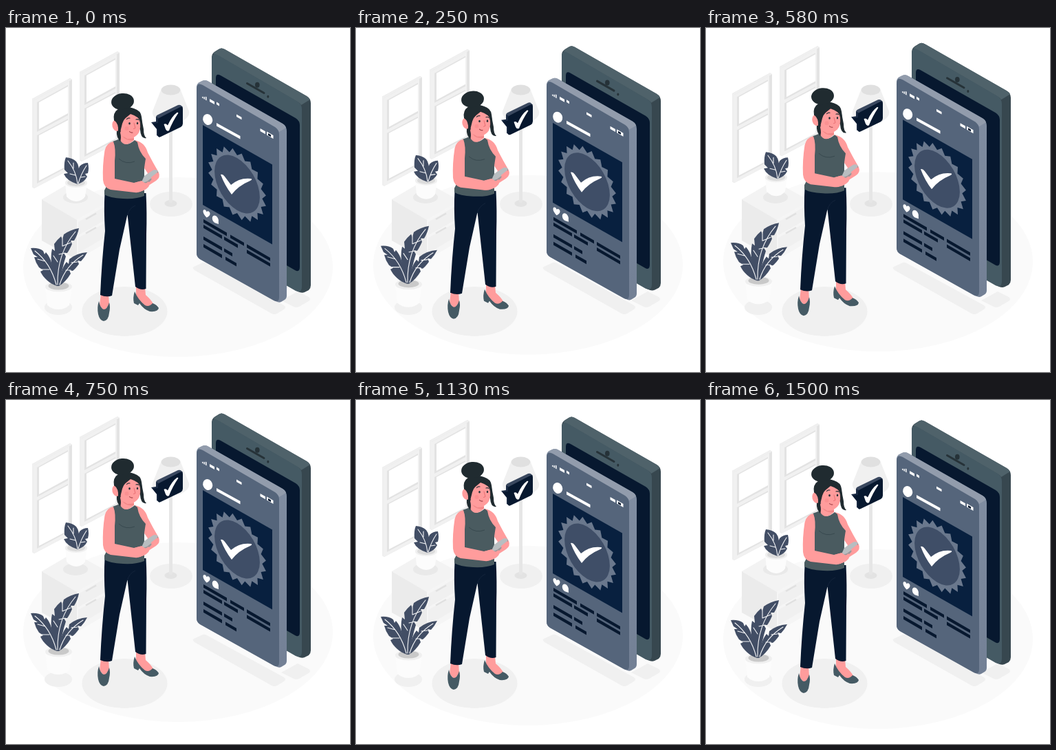
Recreate the animation shown at these times as an HTML page. Size 500 px wide and 500 px high, loop 1540 ms.

```html
<!DOCTYPE html>
<html lang="en">
<head>
<meta charset="utf-8">
<title>Verified post</title>
<style>
  html, body { margin: 0; width: 100%; height: 100%; overflow: hidden; background: #fff; }
  svg { display: block; width: 100vw; height: 100vh; }
  .vein { fill: none; stroke: #f4f5f7; stroke-width: 1.1; stroke-linecap: round; }
</style>
</head>
<body>
<svg viewBox="0 0 500 500">
  <defs>
    <linearGradient id="side" x1="0" y1="0" x2="0" y2="1">
      <stop offset="0" stop-color="#8390a4"/><stop offset="1" stop-color="#738095"/>
    </linearGradient>
    <g id="window">
      <path fill="#e3e3e3" d="M38 103 93 73 96 75V204L41 233 38 231Z"/>
      <path fill="#f0f0f0" d="M38 103 93 73 96 75 41 105V233L38 231Z"/>
      <path fill="#f1f1f1" d="M41 105 92 77V206L41 233Z"/>
      <path fill="#e3e3e3" d="M45 108 90 83V127L45 151ZM45 156 90 132V202L45 226Z"/>
      <path fill="#fff" d="M48 108 90 85V124L48 147ZM48 156 90 134V200L48 222Z"/>
    </g>
  </defs>

  <g class="float">
    <ellipse cx="250" cy="347.5" rx="225" ry="130.5" fill="#fafafa"/>
    <use href="#window"/>
    <use href="#window" x="69" y="-39"/>
  </g>

  <g id="ground" fill="#f0f0f0">
    <ellipse cx="172.500" cy="412" rx="62" ry="36"/>
    <ellipse cx="76" cy="406" rx="20" ry="11"/>
    <path d="M273 347 286 341Q289 340 292 342L404 403Q408 406 404 409L394 415Q390 417 386 415L274 352Q270 349 273 347Z"/>
    <path d="M400 396 424 383 440 391Q444 394 440 397L426 405Q422 407 418 405Z"/>
  </g>

  <g id="cabinet">
    <path fill="#f3f3f3" d="M52 249 98 222 151 251 103 279Z"/>
    <path fill="#ebebeb" d="M52 249 103 279V337L52 309Z"/>
    <path fill="#f5f5f5" d="M103 279 151 251V309L103 337Z"/>
    <path fill="#f0f0f0" d="M105 282 148 257V277L105 301ZM105 305 148 281V302L105 327Z"/>
    <path fill="none" stroke="#e0e0e0" stroke-width="2.500" d="M116 278 131 269.500M116 298.500 131 290"/>
    <ellipse cx="101" cy="246" rx="18" ry="9" fill="#e9e9e9"/>
  </g>

  <g id="lamp">
    <ellipse cx="240" cy="256" rx="31" ry="18" fill="#f0f0f0"/>
    <ellipse cx="239.500" cy="255" rx="9" ry="5" fill="#e3e3e3"/>
    <path fill="#e6e6e6" d="M237 130H242V253Q239.500 255 237 253Z"/>
    <path fill="#f0f0f0" d="M226 88 213 121C211 130 224 139 239.500 139S268 130 266 121L253 88Z"/>
    <ellipse cx="239.500" cy="90" rx="13.800" ry="7.500" fill="#e0e0e0"/>
  </g>

  <g class="float">
    <g id="smallPlant">
      <path fill="#fcfcfc" d="M86 225 88 245Q94 252 102 252T115 245L118 225Z"/>
      <ellipse cx="102" cy="225" rx="16" ry="7" fill="#f0f0f0"/>
      <ellipse cx="102" cy="225" rx="13" ry="5" fill="#dcdcdc"/>
      <path fill="#424e65" d="M104 227Q88 222 84 212L90 211 85 206Q84 195 87 188 97 189 102 194 107 200 106 214ZM104 227Q103 208 107 201 112 196 119 196 121 204 119 211L115 212 118 216Q114 224 104 227Z"/>
      <path class="vein" d="M104 226Q102 208 90 193M105 226Q109 212 117 200M101 214 93 212M98 204 98 196M109 217 115 216"/>
    </g>
    <g id="bigPlant">
      <path fill="#fcfcfc" d="M57 377 60 403Q67 409 76 409T92 403L96 377Z"/>
      <ellipse cx="76.500" cy="376" rx="19.500" ry="7.500" fill="#f0f0f0"/>
      <ellipse cx="76.500" cy="375" rx="15" ry="5.500" fill="#c9c9c9"/>
      <g fill="#424e65">
        <path d="M74 375C64 372 54 363 50 354L54 352 48 348Q43 341 41 333L46 333 40 329 36 320Q47 319 54 324L56 329 58 326Q64 333 66 341 71 355 74 375Z"/>
        <path d="M77 375C78 360 82 347 88 340L91 343 92 336Q103 327 118 326 114 334 109 339L104 338 106 343Q101 350 97 353L92 352 94 357Q87 369 77 375Z"/>
        <path d="M74 375C68 357 63 338 67 321L71 324 70 314Q75 307 80 303L82 307 84 300Q94 293 106 291 104 301 99 309L94 309 96 314Q92 323 89 327L84 327 87 332Q82 347 77 375Z"/>
      </g>
      <path class="vein" d="M75 373Q74 328 101 296M73 373Q65 342 42 324M78 373Q86 346 112 330M75 340 69 331M77 329 86 327M82 317 94 312M82 317 82 306M63 351 52 351M57 339 46 336M87 352 94 352M95 341 104 340"/>
    </g>

    <g id="backPhone">
      <path fill="#37474f" d="M299 43Q299 37 304 34L309 31Q313 28 318 31L437 99Q443 103 443 109V374Q443 378 440 381L434 384Q430 386 424 383L299 312Z"/>
      <path fill="#4f626a" d="M301 37 309 31Q313 28 318 31L437 99Q441 101 442 104L429 112Q428 110 425 108L310 41Q304 38 301 37Z"/>
      <path fill="#455a64" d="M299 45Q299 34 309 40L424 107Q430 111 430 118V376Q430 386 421 382L299 312Z"/>
      <path fill="#07182f" d="M305 73Q305 65 312 69L421 131Q427 135 427 141V347Q427 356 420 352L305 286Z"/>
      <path fill="none" stroke="#263238" stroke-width="3" stroke-linecap="round" d="M350.500 80.500 375 94.500"/>
      <ellipse cx="365.300" cy="82.800" rx="3.300" ry="4" fill="#263238"/>
      <ellipse cx="380.800" cy="99.800" rx="1.500" ry="2" fill="#263238"/>
    </g>

    <g id="frontPhone">
      <path fill="url(#side)" d="M277 86Q277 81 281 79L285 77Q289 75 293 77L402 139Q408 143 408 150V389Q408 393 405 395L400 398Q397 400 392 397L282 336Q277 333 277 327Z"/>
      <path fill="#929cac" d="M279 80 285 77Q289 75 293 77L402 139Q406 141 407 145L397 151 393 146 285 83Z"/>
      <path fill="#55657b" d="M277 89Q277 78 286 83L391 144Q397 148 397 155V391Q397 400 389 396L282 336Q277 333 277 327Z"/>
      <path fill="#08203f" d="M286 141 387 198.500V314.500L286 257Z"/>
      <g transform="matrix(.866 .5 0 1 336 227)">
        <path id="burst" fill="#6a788d"/>
        <circle r="38" fill="#3f4e67"/>
      </g>
      <g fill="#fff">
        <path d="M312 213Q315 212 318 216L327 228Q340 217 356 219 359 220 355 222 338 229 328 242 318 229 312 213Z"/>
        <path d="M285 99.500 286.500 100.500V102.500L285 101.500ZM287.500 99.500 289 100.500V104L287.500 103ZM290 99.500 291.500 100.500V105.500L290 104.500ZM296 103 303 107V111L296 107ZM306 107.500 310 110V113.500L306 111ZM335 125.500 342.500 129.800V133.300L335 129ZM369.500 146 377 150.300V154.300L369.500 150ZM379 150.500 388.500 156V161L379 155.500Z"/>
        <ellipse cx="293.200" cy="133" rx="6.800" ry="8.200" transform="rotate(-22 293.200 133)"/>
        <path d="M306 138 340.500 157V161.500L306 142.500Z"/>
        <path d="M291.500 275.500Q286.500 270 286.500 266.500C286.500 262.500 290.500 263.500 291.700 267.200 293.200 265 297 267.500 296.500 270.500Q296 273.500 291.500 275.500Z"/>
        <path d="M309 285 304.500 283.500C300 282 298.500 275.500 301 273.300 304.500 270.500 310 277 308.800 281.500Z"/>
      </g>
      <path fill="#07182f" d="M381 153 385 155.300V158.200L381 156Z"/>
      <g id="lines" fill="#07182f"></g>
    </g>

    <g id="bubble">
      <path fill="#3a485f" d="M218 130Q218 127 221 126L250 112Q253 111 255 113L257 115 224 133Z"/>
      <path fill="#1a2a43" d="M218 129 222 131V158L219 156V147L211 137 218 136Z"/>
      <path fill="#07182f" d="M221 134Q221 131 224 130L253 115Q257 113 257 117V139Q257 142 254 144L225 158Q221 160 221 156V148L213 139 221 138Z"/>
      <path fill="#fff" d="M229.500 140Q232 138 235 141.500 241 128 249 122.500L250.500 123.500Q242 136 237 149 234 151 232 147Z"/>
    </g>

    <g id="woman">
      <g id="feet">
        <path fill="#ff9c9c" d="M138 386H149L150 402 143 411 136 403ZM189 374 202 377 203 388Q212 396 214 401L206 408Q193 399 189 388Z"/>
        <path fill="#455a64" d="M135 397Q132 406 134 416 136 425 142 426 149 425 150 414 152 405 150 399 147 409 142 409 137 407 135 397ZM187 383Q184 392 186 400L192 403 194 400Q200 409 209 412 221 413 222 407 219 402 213 400 208 406 202 403 192 395 187 383Z"/>
      </g>
      <path fill="#07182f" d="M143.500 240 203.500 240Q205 268 204 300L203.500 379Q196 382 188 376L181 312 176.500 271 165 322 154 389Q146 392 137 388 139 340 144 295 142 265 143.500 240Z"/>
      <path fill="none" stroke="#14243c" d="M176.500 272Q179 262 188 258"/>
      <path fill="#ff9c9c" d="M187 163Q202 166 206 181L214 196 222 210Q225 217 218 222L207 229 198 222 206 211 197 198Z"/>
      <path fill="#4a5b60" d="M155 165 166 161Q173 175 187 163L191 166Q193 180 203 190 202 196 201 203V244Q190 249 170 248 150 247 143 242L143 236 154 215Z"/>
      <path fill="none" stroke="#38494f" d="M164 190Q174 199 187 194"/>
      <path fill="#ff9c9c" d="M166 148H186V163Q173 175 166 163Z"/>
      <path fill="#f28888" d="M169 157Q177 162 186 160V163Q175 165 169 157Z"/>
      <path fill="#ff9c9c" d="M156 165Q146 167 143.500 178 140 200 141 221 142 232 152 235L187 239Q195 240 202 234L206 225 194 223 186 225 158 219 158 193Q160 175 156 165Z"/>
      <path fill="#b8bdc0" d="M196 226 201 215 214 206.500Q219 205 221 208L218 213 205 223Z"/>
      <path fill="#93999d" d="M196 226 205 223 218 213 221 208 221 211 207 225Z"/>
      <path fill="#ff9c9c" d="M187 225 197 222 203 226 207 223Q210 226 207 231 201 238 191 238ZM211 217 220 210Q224 214 219 219L212 223Z"/>

      <path fill="#202b30" d="M157 134Q155 123 163 118 173 112 186 117 196 120 197 129 198 138 200 147 200 157 204 160 196 162 195 148L186 132 170 142 166 152Q168 160 166 165 160 158 161 150Z"/>
      <ellipse cx="169.500" cy="107" rx="16.500" ry="12" fill="#202b30" transform="rotate(-6 169.500 107)"/>
      <path fill="#ff9c9c" d="M167 138Q174 130 182 124 193 126 195 138 196 150 191 155 185 161 176 161 168 155 166 148Z"/>
      <ellipse cx="160" cy="142" rx="5.500" ry="8" fill="#ff9c9c" transform="rotate(-15 160 142)"/>
      <path fill="#202b30" d="M157 134Q160 118 178 117 195 118 198 138 192 128 181 125 172 129 169 139L166 151 163 150Q164 139 157 134Z"/>
      <path fill="none" stroke="#263238" stroke-width="1.200" stroke-linecap="round" d="M175.500 132.500Q177 130.500 180 131M189 133Q191 132 193 133.500"/>
      <ellipse cx="179.500" cy="138.800" rx="1.300" ry="1.800" fill="#263238"/>
      <ellipse cx="191" cy="138.500" rx="1.200" ry="1.800" fill="#263238"/>
      <path fill="none" stroke="#e86f73" stroke-linecap="round" d="M186 138 188 145.500 185.500 146.500"/>
      <path fill="none" stroke="#9e3f45" stroke-width="1.100" stroke-linecap="round" d="M179.500 150.500Q181 152.500 184 152"/>
      <circle cx="175.500" cy="146" r="3" fill="#f78b8c" opacity=".6"/>
    </g>
  </g>
</svg>
<script>
  const LOOP = 1540, STEP = 125 / 3, RISE = 10;
  const floats = document.querySelectorAll(".float");

  function star(points, outer, inner) {
    const dots = Array.from({ length: points * 2 }, (_, i) => {
      const r = i % 2 ? outer : inner;
      const a = Math.PI * i / points;
      return (r * Math.cos(a)).toFixed(2) + " " + (r * Math.sin(a)).toFixed(2);
    });
    return "M" + dots.join("L") + "Z";
  }
  document.getElementById("burst").setAttribute("d", star(20, 49, 42));

  // Each row: height at the left margin, then start and end of its bars.
  const rows = [
    [278, 287, 321, 326, 346, 350, 384],
    [286, 287, 314, 317, 337, 350, 384],
    [303, 287, 314, 317, 329],
    [314, 287, 314, 319, 335]
  ];
  function bar(top, from, to) {
    const y = x => top + (x - 287) * 0.577;
    return `<path d="M${from} ${y(from)}L${to} ${y(to)}v4.800L${from} ${y(from) + 4.8}Z"/>`;
  }
  document.getElementById("lines").innerHTML = rows.map(([top, ...xs]) => {
    let out = "";
    for (let i = 0; i < xs.length; i += 2) out += bar(top, xs[i], xs[i + 1]);
    return out;
  }).join("");

  function draw(ms) {
    const step = Math.min(36, Math.floor((ms % LOOP + 4.9) / STEP));
    const y = -RISE * (1 - Math.abs(1 - step / 18));
    for (const g of floats) g.setAttribute("transform", `translate(0 ${y.toFixed(3)})`);
  }

  const start = performance.now();
  function tick() {
    draw(performance.now() - start);
    requestAnimationFrame(tick);
  }
  draw(0);
  requestAnimationFrame(tick);
</script>
</body>
</html>
```
